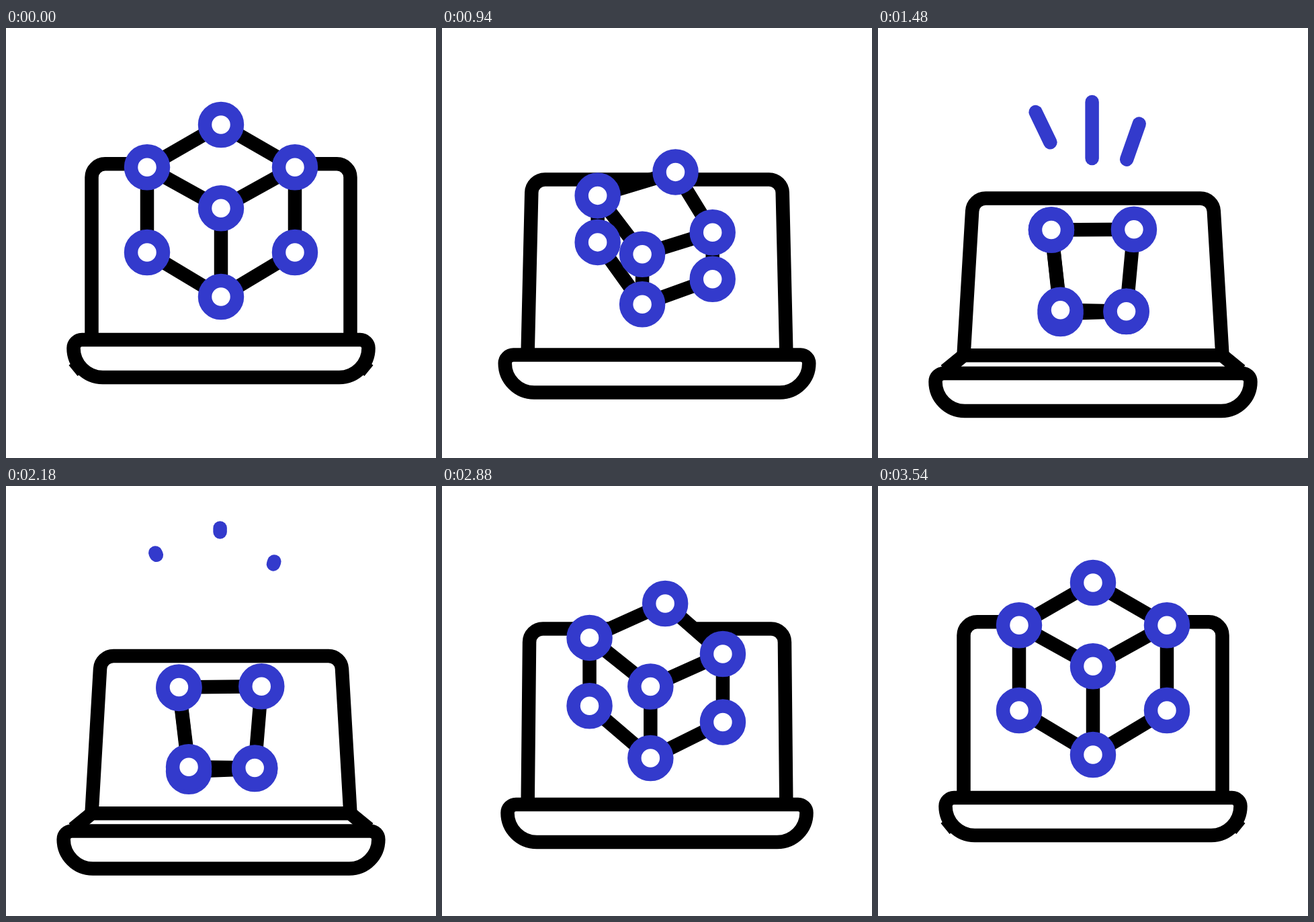
An HTML page with a canvas that plays this animation: 640 by 640 pixels, repeating every 3600 ms.

```html
<!DOCTYPE html>
<html lang="en">
<head>
<meta charset="utf-8">
<title>Laptop with folding cube</title>
<style>
  html, body { margin: 0; width: 100%; height: 100%; overflow: hidden; background: #fff; }
  canvas { display: block; width: 640px; height: 640px; }
</style>
</head>
<body>
<canvas id="stage" width="640" height="640"></canvas>
<script>
const ctx = document.getElementById('stage').getContext('2d');
const LOOP = 3600, HALF = 1775, BLUE = '#333acc';

// Open position and travel of each cube corner: x, y, dx, dy (drawn back to front)
const corners = {
  lowLeft:  [210, 334, 48, -33.5],
  lowRight: [430, 334, -60.5, 88],
  bottom:   [320, 400, -48.5, 25],
  top:      [320, 144, 61, 156],
  left:     [210, 207.3, 48, 93.3],
  right:    [430, 207.3, -60.5, 214.7],
  center:   [320, 268.2, -48.5, 151.8]
};
const outline = ['top', 'right', 'lowRight', 'bottom', 'lowLeft', 'left'];
const inner = ['left', 'right', 'bottom'];

// Rays run from the first point to the second
const rays = [
  [256.5, 170.5, 222.3, 99.5],
  [318.6, 194.5, 318.6, 62.5],
  [370, 196, 399.3, 112.5]
];

const clamp = v => Math.min(1, Math.max(0, v));
const mix = (a, b, k) => a + (b - a) * k;

// cubic-bezier(.87, 0, .24, 1)
function ease(u) {
  u = clamp(u);
  let lo = 0, hi = 1, s = 0.5;
  for (let i = 0; i < 24; i++) {
    s = (lo + hi) / 2;
    const r = 1 - s;
    const x = 3 * r * r * s * 0.87 + 3 * r * s * s * 0.24 + s * s * s;
    if (x < u) lo = s; else hi = s;
  }
  return s * s * (3 - 2 * s);
}

function drawPath(points, close) {
  ctx.beginPath();
  points.forEach(([x, y]) => ctx.lineTo(x, y));
  if (close) ctx.closePath();
}

function drawLaptop(p) {
  // hinge
  drawPath([[100, 510], [127.5, 487.3], [512.5, 487.3], [540, 510]]);
  ctx.stroke();

  // lid
  const x = 127.5 + 13.8 * p, y = 202.3 + 51.2 * p;
  ctx.beginPath();
  ctx.moveTo(127.5, 487.3);
  ctx.arcTo(x, y, 320, y, 20);
  ctx.arcTo(640 - x, y, 512.5, 487.3, 20);
  ctx.lineTo(512.5, 487.3);
  ctx.stroke();

  // base
  const l = 100.5 - 15 * p, r = 640 - l, t = 464 + 50 * p, b = t + 56;
  ctx.beginPath();
  ctx.moveTo(320, t);
  ctx.arcTo(r, t, r, t + 12.5, 12.5);
  ctx.arcTo(r, b, 320, b, 43.5);
  ctx.arcTo(l, b, l, t + 12.5, 43.5);
  ctx.arcTo(l, t, 320, t, 12.5);
  ctx.closePath();
  ctx.fill();
  ctx.stroke();
}

function drawCube(p) {
  const at = {};
  for (const name in corners) {
    const [x, y, dx, dy] = corners[name];
    at[name] = [x + dx * p, y + dy * p];
  }
  drawPath(outline.map(name => at[name]), true);
  ctx.fill();
  ctx.stroke();
  for (const name of inner) {
    drawPath([at.center, at[name]]);
    ctx.stroke();
  }
  ctx.strokeStyle = BLUE;
  for (const name in at) {
    ctx.beginPath();
    ctx.arc(...at[name], 24, 0, 2 * Math.PI);
    ctx.fill();
    ctx.stroke();
  }
}

function drawRays(t) {
  const head = 1 - Math.pow(1 - clamp((t - 1100) / 1100), 2.4);
  const u = clamp((t - 1450) / 840);
  const tail = u * u * (3 - 2 * u);
  if (head <= tail) return;
  ctx.lineCap = 'round';
  for (const [x1, y1, x2, y2] of rays) {
    drawPath([tail, head].map(k => [mix(x1, x2, k), mix(y1, y2, k)]));
    ctx.stroke();
  }
}

function draw(now) {
  const t = now % LOOP;
  const p = 1.02 * (t < HALF ? ease(t / HALF) : 1 - ease((t - HALF) / HALF));
  ctx.fillStyle = '#fff';
  ctx.fillRect(0, 0, 640, 640);
  ctx.strokeStyle = '#000';
  ctx.lineWidth = 20.5;
  ctx.lineJoin = 'round';
  ctx.lineCap = 'butt';
  drawLaptop(p);
  drawCube(p);
  drawRays(t);
}

const start = performance.now();
function tick() {
  draw(performance.now() - start);
  requestAnimationFrame(tick);
}
tick();
</script>
</body>
</html>
```
